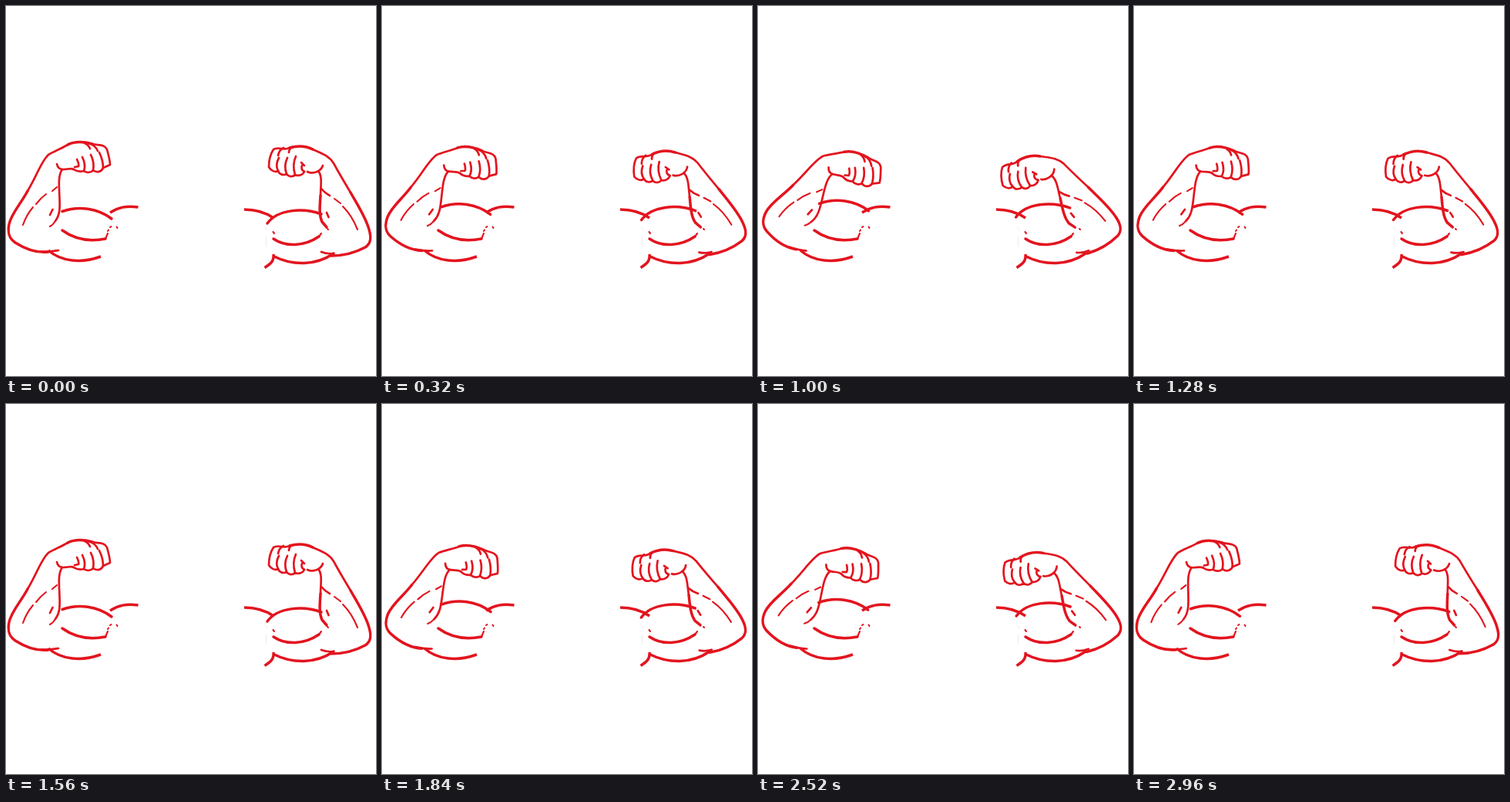
These frames come from a looping animation (480x480 px, 3 s). An HTML page:

```html
<!DOCTYPE html>
<html lang="en">
<head>
<meta charset="utf-8">
<title>Flexing arms</title>
<style>
  html, body { margin: 0; height: 100%; overflow: hidden; background: #fff; }
  svg { display: block; width: 100vw; height: 100vh; }
  path { fill: none; stroke: #e3141e; stroke-width: 2.7; stroke-linecap: round; stroke-linejoin: round; }
  .bold { stroke-width: 3.5; }
  .thin { stroke-width: 2.1; }
  .cut { stroke-linecap: butt; }
  .faint { stroke: #ececec; stroke-width: 1; }
</style>
</head>
<body>
<svg viewBox="0 0 480 480">
  <!-- shoulders and upper arms -->
  <path class="bold cut" d="M135 268C146 261 156 259 171.5 261"/>
  <path class="bold" d="M73 291C88 302 108 306 129 302"/>
  <path class="thin" d="M129 302L132 295M133 290.5L132 292M136.5 286L135 287M143.5 286.5L144.5 288"/>
  <path class="bold cut" d="M55 317C72 332 98 334 123 325"/>
  <path class="bold cut" d="M309 264C325 264 337 268 347 275"/>
  <path class="bold" d="M347 302C363 313 387 312 406 299"/>
  <path class="thin" d="M406 299L409 295M346.5 293L348 295M417 289L418 290"/>
  <path class="bold" d="M348 325C372 337 402 337 425 321"/>
  <path class="bold cut" d="M335.5 339.5C343 335 348 331 347 322"/>
  <path class="faint" d="M336 287L339 291M337.5 299V312"/>

  <path id="bicepsL" class="bold" d="M73 266.5C94 259 119 262 137 276"/>
  <path id="bicepsR" class="bold" d="M339 282C352 264 385 261 409 270"/>

  <g id="armL">
    <path class="bold" d="M55 319C37 321 23 314 12 307C3 301 2 293 4 283C7 269 19 257 28 240"/>
    <path d="M68 317C63 318 59 319 46 318.500M28 240C40 220 46 201 55 193C63 188 72 185 80 180"/>
    <path class="bold" d="M80 180C90 175 101 176 112 179"/>
    <path d="M112 179C120 181 128 179 131 186C133 194 135 200 135 206L126 210"/>
    <path d="M108 178Q116 181 119 188M102 178Q107 180 109 185"/>
    <path d="M99 196Q104 206 101 214M110 193Q115 203 113 213M121 190Q126 200 126 210"/>
    <path d="M88 212C92 215 97 215 101 214C105 217 111 216 113 213C118 217 124 215 126 210"/>
    <path d="M66 205C67 210 70 212 74 212C80 212 84 210 88 212M92 199Q95 205 94 208L89 209"/>
    <path d="M73 212C67 220 69 235 69.500 250C70 262 70 271 64 279"/>
    <path class="thin" d="M64 279Q61 284 57 286"/>
    <path class="thin" d="M22 284C25 275 30 267 35 261M39 257Q45 249 52 244M60 240L66 235"/>
    <path d="M60.500 264L57 271"/>
  </g>

  <g id="armR">
    <path d="M409 319Q416 322 425 321"/>
    <path class="bold" d="M422 324C441 324 455 319 466 313C474 308 474 300 471 290C467 275 456 258 447 242"/>
    <path d="M447 242C438 227 431 215 425 204C419 194 409 191 398 186"/>
    <path class="bold" d="M398 186C388 181 378 181 368 184"/>
    <path d="M368 184C360 188 354 182 347 186C343 192 341 202 341 209C344 214 349 216 353 214"/>
    <path d="M360 184Q354 187 353 194M371 183Q367 186 367 190"/>
    <path d="M354 197Q349 206 353 214M365 197Q360 207 364 218M376 195Q371 206 375 219"/>
    <path d="M353 214C355 219 360 220 364 218C367 222 372 222 375 219C380 221 385 219 387 215"/>
    <path d="M383 203L387 207M384 207Q382 212 387 215M391 215C397 218 408 216 411 207"/>
    <path d="M405 214C411 221 408 234 408 246"/>
    <path class="bold" d="M408 246C407 260 406 271 410 280L416 287"/>
    <path d="M409 237Q414 243 420 246"/>
    <path class="thin" d="M426 250L434 256M437 260C446 269 452 280 456 290"/>
    <path d="M416 268L418.500 274"/>
  </g>
</svg>
<script>
const LOOP = 3000, STEP = 40, SWING = 22;
// [time, how far the arms are flexed]
const keys = [[0, 0], [780, .98], [1280, .41], [1560, 0], [1840, .455], [2245, 1], [LOOP, 0]];

function flex(t) {
  const i = keys.findIndex(k => k[0] > t);
  const [t0, a] = keys[i - 1], [t1, b] = keys[i];
  return a + (b - a) * (t - t0) / (t1 - t0);
}

const place = (id, transform) => document.getElementById(id).setAttribute('transform', transform);

function draw() {
  const t = Math.floor(performance.now() % LOOP / STEP) * STEP;
  const p = flex(t), angle = SWING * p;
  place('armL', `rotate(${angle} 63.5 298)`);
  place('armR', `rotate(${-angle} 414 304)`);
  place('bicepsL', `translate(${9 * p} ${-14 * p})`);
  place('bicepsR', `translate(${-6 * p} ${-11 * p})`);
  requestAnimationFrame(draw);
}
draw();
</script>
</body>
</html>
```
